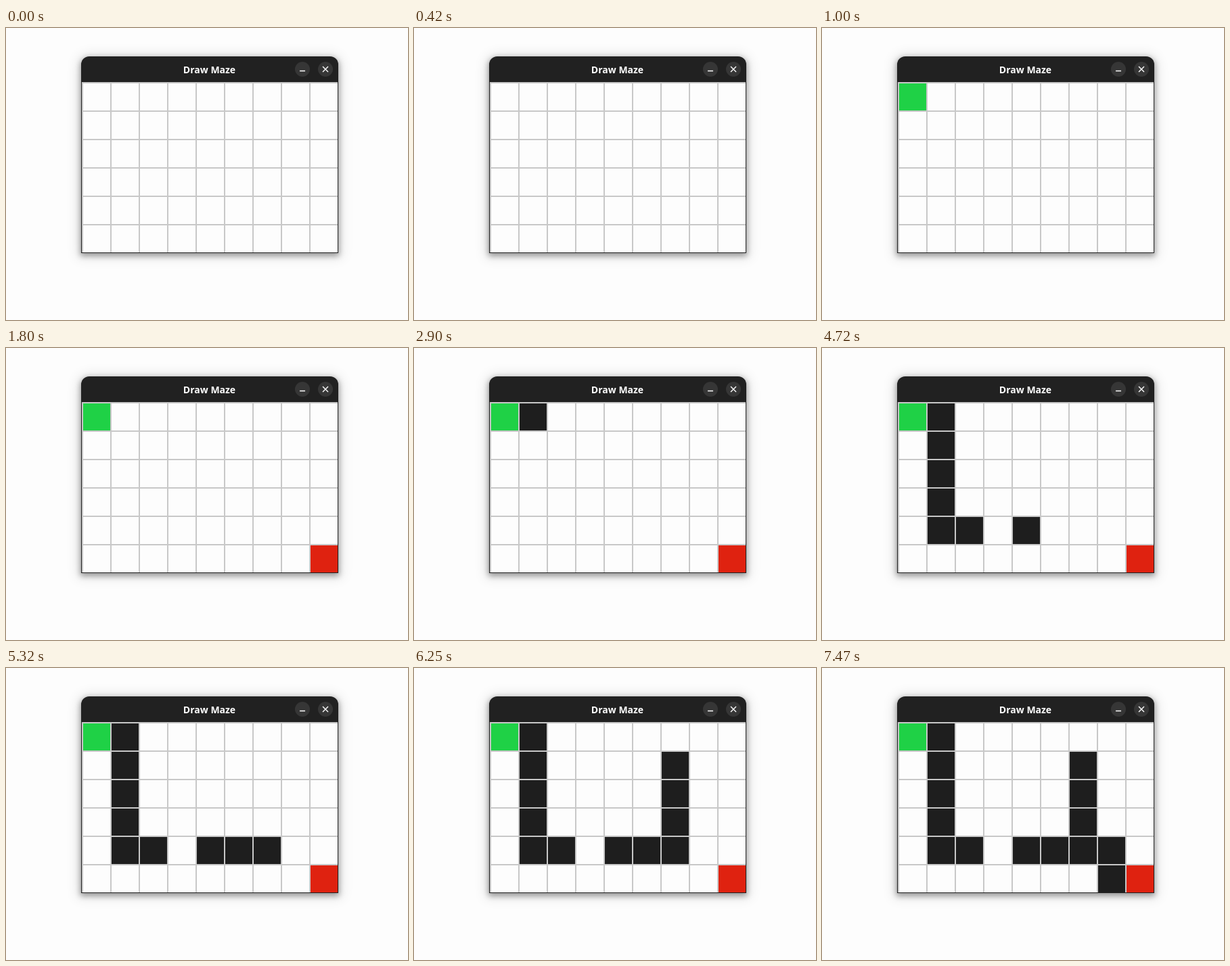
Animation, 594 px wide and 432 px high, one loop 8000 ms. Source, as an HTML page:

```html
<!DOCTYPE html>
<html lang="en">
<head>
<meta charset="utf-8">
<title>Draw Maze</title>
<style>
  html, body { margin: 0; width: 100%; height: 100%; overflow: hidden; background: #fdfdfd; }
  .window {
    position: absolute; left: 111px; top: 42px; width: 380px; height: 291px;
    border-radius: 12px 12px 0 0; background: #212121;
    box-shadow: 0 3px 9px 1px rgba(0, 0, 0, .38), 0 2px 18px 6px rgba(0, 0, 0, .09);
  }
  svg { position: absolute; left: 0; top: 0; }
  text { font: 700 14px "Noto Sans", "Open Sans", sans-serif; fill: #fff; text-anchor: middle; }
</style>
</head>
<body>
<div class="window"></div>
<svg width="594" height="432" viewBox="0 0 594 432">
  <text x="300.5" y="67">Draw Maze</text>
  <g fill="#363636">
    <circle cx="438" cy="61" r="11"/>
    <circle cx="472" cy="61" r="11"/>
  </g>
  <path d="M434 63.5h8M468 57l8 8M476 57l-8 8" stroke="#fff" stroke-width="1.4"/>
  <rect x="112" y="80" width="378" height="252" fill="#c8c8c8"/>
  <g id="cells"></g>
</svg>
<script>
const LOOP = 8000, COLS = 9, ROWS = 6, PITCH = 42;
const EMPTY = "#fdfdfd", START = "#1fd146", GOAL = "#df2210", WALL = "#1e1e1e";
const MOVES = { D: [0, 1], U: [0, -1], R: [1, 0] };

const group = document.getElementById("cells");
const cells = [];
for (let row = 0; row < ROWS; row++)
  for (let col = 0; col < COLS; col++) {
    const rect = document.createElementNS("http://www.w3.org/2000/svg", "rect");
    const box = { x: 114 + col * PITCH, y: 82 + row * PITCH, width: 40, height: 40 };
    for (const key in box) rect.setAttribute(key, box[key]);
    cells.push({ rect: group.appendChild(rect), at: Infinity, color: EMPTY });
  }

function mark(col, row, at, color) {
  Object.assign(cells[row * COLS + col], { at, color });
}

// Fills a run of wall cells at an even pace, following the moves
function wall(col, row, at, step, moves) {
  mark(col, row, at, WALL);
  for (const move of moves) {
    col += MOVES[move][0];
    row += MOVES[move][1];
    mark(col, row, at += step, WALL);
  }
}

mark(0, 0, 1000, START);
mark(COLS - 1, ROWS - 1, 1800, GOAL);
wall(1, 0, 2900, 236, "DDDDR");
wall(4, 4, 4720, 300, "RRUUU");
wall(7, 5, 7230, 240, "U");

function draw() {
  const time = performance.now() % LOOP;
  for (const { rect, at, color } of cells)
    rect.setAttribute("fill", time >= at ? color : EMPTY);
  requestAnimationFrame(draw);
}
draw();
</script>
</body>
</html>
```
